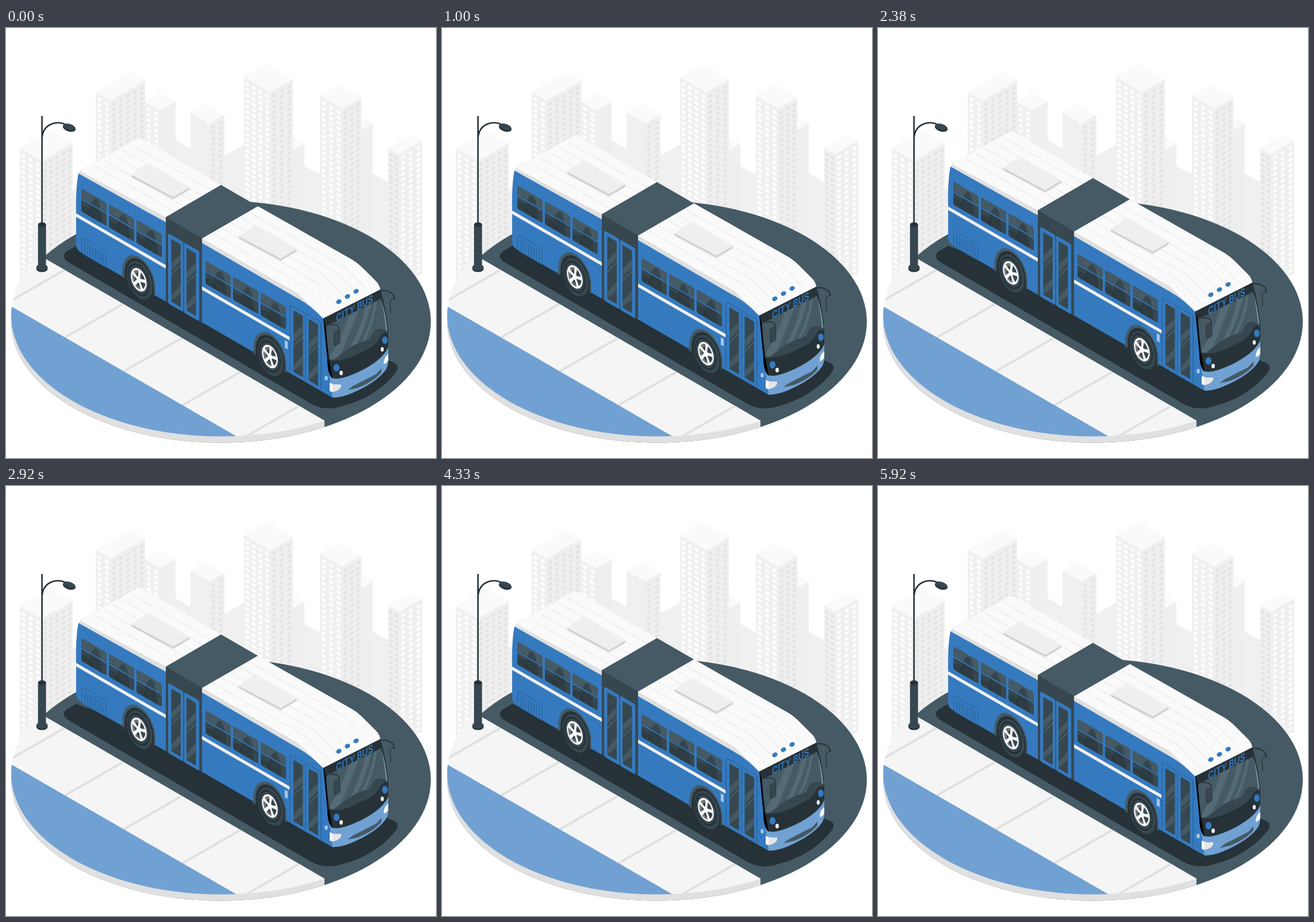
An HTML page for the animation above (5960 ms loop, 748 by 748 pixels).

```html
<!DOCTYPE html>
<html lang="en">
<head>
<meta charset="utf-8">
<title>City bus</title>
<style>
html, body { margin: 0; width: 100%; height: 100%; overflow: hidden; background: #fff; }
svg { display: block; width: 100vw; height: 100vh; }
</style>
</head>
<body>
<svg id="stage" viewBox="0 0 748 748"></svg>
<script>
const BLUE = '#357abf', PALE = '#71a1d3', DEEP = '#2a6299', MIST = '#a9c6e4';
const INK = '#263238', DARK = '#37474f', SLATE = '#455a64', WHITE = '#fafafa';
const SLOPE = 0.577;

const path = (d, fill, extra = '') => `<path d="${d}" fill="${fill}" ${extra}/>`;
const line = (d, color, width, extra = '') =>
  path(d, 'none', `stroke="${color}" stroke-width="${width}" ${extra}`);
const oval = (x, y, rx, ry, fill, turn = 0) =>
  `<ellipse cx="${x}" cy="${y}" rx="${rx}" ry="${ry}" fill="${fill}" transform="rotate(${turn} ${x} ${y})"/>`;
const rect = (w, h, r, fill, x = 0) => `<rect x="${x}" width="${w}" height="${h}" rx="${r}" fill="${fill}"/>`;
const repeat = (n, fn) => Array.from({ length: n }, (_, i) => fn(i)).join('');
// Walls that fall (k = 1) or climb (k = -1) to the right
const wall = (x, y, body, k = 1) => `<g transform="matrix(1 ${k * SLOPE} 0 1 ${x} ${y})">${body}</g>`;

// A block from its left corner and the widths of its two walls
function tower(x, y, left, right, leftGlass, rightGlass) {
  const h = 440 - y;
  const face = (w, fill, glass) => {
    const cols = Math.round(w / 12), pitch = w / cols;
    const d = repeat(cols, i => `M${(i + 0.5) * pitch} 7V${h}`);
    return path(`M0 0H${w}V${h}H0Z`, fill) + (glass ? line(d, glass, 6.2, 'stroke-dasharray="5.2 4.5"') : '');
  };
  const dy = left * SLOPE, ry = right * SLOPE;
  return wall(x, y, face(left, '#f0f0f0', leftGlass)) +
    wall(x + left, y + dy, face(right, '#efefef', rightGlass), -1) +
    path(`M${x} ${y}l${right} ${-ry} ${left} ${dy} ${-right} ${ry}Z`, WHITE);
}

function city() {
  const shade = '#e4e4e4', lit = '#fff';
  return path('M116 282L156 258V200L295 195L322 211L380 222L414 203L519 240L546 255L638 253L665 268V440H116Z', '#f0f0f0') +
    tower(479, 201, 20, 20) + tower(598, 166, 20, 20) +
    tower(242, 128, 26, 27, lit) +
    tower(156, 111, 26, 60, lit, shade) +
    tower(321, 147, 33, 26, '', shade) +
    tower(414, 85, 46, 39, lit, shade) +
    tower(546, 117.5, 39, 33, lit, shade) +
    tower(665, 208, 19, 40, shade, lit) +
    tower(24, 209, 38, 54, lit, shade);
}

function ground() {
  const R = 365, r = R * SLOPE, curb = x => 683 + 0.58 * (x - 554);
  const joints = repeat(5, i => `M${102 + 102 * i} ${curb(102 + 102 * i)}l-101 58`);
  return `<clipPath id="walk">${path(`M0 ${curb(0)}L554 683V748H0Z`)}</clipPath>
    <clipPath id="top">${oval(374, 500, R, r)}</clipPath>` +
    oval(374, 511, R, r, SLATE) +
    '<g clip-path="url(#walk)">' + oval(374, 511, R, r, '#e0e0e0') +
      '<g clip-path="url(#top)">' + rect(748, 748, 0, '#f5f5f5') +
        line(joints, '#e0e0e0', 4) + path('M0 479L403 711.5V748H0Z', PALE) +
      '</g></g>' +
    path('M122 379L105 389Q95 398 108 407L528 652Q553 668 584 658Q642 643 675 603Q687 589 676 583L655 574Z', INK);
}

function lamp() {
  return line('M62.6 153V345M62.6 192C64 168 86 159 106 169', INK, 2.6) +
    oval(110, 173.5, 11.5, 6.5, INK, 17) + oval(110, 172, 10.5, 5, DARK, 17) +
    oval(62.6, 419, 10, 5.5, INK) + oval(62.6, 416.5, 10, 5.5, DARK) +
    path('M55.6 342V417A7 4 0 0 0 69.6 417V342Z', DARK) +
    oval(62.6, 342, 7, 4, INK);
}

const busWindow = (x, y) => wall(x, y,
  rect(44, 40, 3, DARK) +
  path('M3 0H41Q44 0 44 3V16H0V3Q0 0 3 0Z', SLATE) +
  path('M13 33C16 20 20 3 27 3Q32 4 33 16L36 31V40H17Q11 38 13 33Z', INK, 'opacity=".5"') +
  path('M0 29L12 26Q18 29 19 40H3Q0 40 0 37Z', INK, 'opacity=".45"') +
  line('M0 18H44', BLUE, 2.2));

const glass = (x, y, h) => wall(x, y,
  rect(16.5, h, 1.5, DARK) +
  path(`M0 42l16.5-26v13l-16.5 26zM0 60l16.5-26v4l-16.5 26zM0 ${h - 11}l16.5-28v15l-16.5 23z`, SLATE));

function wheel(x, y) {
  const disc = (r, fill, dx = 0) => oval(dx, 0, r, r, fill);
  const spokes = repeat(5, i => path('M-2-4L-2.8-15H2.8L2-4Z', WHITE, `transform="rotate(${i * 72 + 8})"`));
  return `<g transform="matrix(.8 .42 0 1.12 ${x} ${y})">` +
    path('M-36 9V0A36 36 0 0 1 36 0V12Z', SLATE) +
    path('M-31 10V0A32 32 0 0 1 33 0V12Z', INK) +
    disc(28, DARK, 2) + disc(24, INK) + disc(21, DARK) +
    disc(17.2, WHITE) + disc(14.3, '#757575') + disc(11.5, DARK, 2.5) +
    spokes + disc(4.8, WHITE) + '</g>';
}

function hatch(x, y) {
  const top = 'M0 0l71 41-27 16-72-38Z';
  const style = fill => `stroke="${fill}" stroke-width="1.5" stroke-linejoin="round"`;
  return `<g transform="translate(${x} ${y})">` +
    path('M-28 19v4l72 38 27-16v-4Z', '#d2d2d2', style('#d2d2d2')) +
    path(top, '#efefef', style('#efefef')) + '</g>';
}

function roof() {
  const grooves = repeat(5, i => {
    const x = 16 * (i + 1), y = 9.3 * (i + 1);
    return `M${138 + x} ${249 - y}l140 80m64 37l164 94 42 42`;
  });
  return path('M126 256Q127 248 134 245L228 192.5Q232 190 237 193L374 273L278 329V338Z', '#e0e0e0') +
    path('M131 250Q130 247 135 245L228 192.5Q232 190 237 193L374 273L278 329Z', WHITE) +
    path('M341 366L438 310L602 403Q612 409 622 419L643 440Q650 447 651 455L552 506L505 470L341 375Z', '#e0e0e0') +
    path('M341 366L438 310L602 403Q612 409 622 419L643 440Q650 447 651 455L552 505L508 462Z', WHITE) +
    line(grooves, '#e8e8e8', 1.2) +
    hatch(247, 236) + hatch(434, 343) +
    repeat(3, i => oval(579 + 15 * i, 476 - 9 * i, 4.8, 3.8, BLUE, -30));
}

function bodySide() {
  const vents = repeat(8, i => `M${5.5 + i * 4.5} 6V25`);
  return path('M126 253L278 338V476L133 392Q122 386 122 378V324Q121 278 126 253Z', BLUE) +
    path('M341 374L505 469Q530 482 552 506L562 578L568 643L341 512Z', BLUE) +
    wall(122, 322.5, rect(156, 6, 0, '#f0f0f0')) + wall(341, 449.5, rect(153, 6, 0, '#f0f0f0')) +
    wall(132, 364, line('M4 0H39Q42 0 42 3V28H4Q0 28 0 24V4Q0 0 4 0Z' + vents, DEEP, 1.2)) +
    repeat(3, i => busWindow(131 + 48 * i, 279 + 27.4 * i) + busWindow(347 + 48 * i, 405 + 27.4 * i)) +
    // Flexible joint and its door
    path('M278 329L374 273L438 310L341 366Z', SLATE) +
    path('M278 329L341 366V513L278 476Z', DARK) +
    wall(282, 357, rect(26.5, 122, 3, BLUE) + rect(26.5, 122, 3, BLUE, 27.7)) +
    glass(287.5, 367, 109) + glass(314, 382.5, 109) +
    // Front door
    wall(494, 481, line('M0 117V4Q0 0 4 0H51Q54 0 54 4V117M27 2V117', DEEP, 1.3)) +
    glass(500, 491, 107) + glass(526.5, 506, 107) +
    wall(485, 543, rect(5, 13, 0, MIST)) + oval(557, 609, 2.8, 4, MIST) +
    wheel(231, 438) + wheel(459, 571.5);
}

function windshield() {
  const streak = (x, w) => `M${x} 477h${w}Q${x - 2} 530 ${x + w - 40} 576h${-w}Q${x - 8} 530 ${x} 477Z`;
  return `<clipPath id="pane">${path('M557 519L652 471Q662 499 664 535Q654 560 618 574Q585 589 564 580Q559 555 557 519Z')}</clipPath>
    <g clip-path="url(#pane)">` + rect(748, 748, 0, SLATE) +
    path(streak(600, 19) + streak(626, 10) + streak(641, 4), '#546a74') +
    path('M560 585L590 562Q605 549 634 541Q638 524 650 523Q660 523 670 535V590Z', DARK) +
    path('M640 450H670V527H661Q658 494 652 470Z', '#78909c') + '</g>';
}

function front() {
  return path('M560 583L568 643Q583 643 600 636Q645 617 661 594Q665 588 665 575V548Z', PALE) +
    path('M552 505L651 455Q661 485 665 528V555Q657 575 622 594Q582 614 568 609Q560 602 559 575Z', INK) +
    path('M552 503L556 519L561 578L568 582V610Q559 602 559 577Z', '#000') +
    windshield() +
    path('M562 577Q585 583 622 562Q642 554 650 540Q655 527 664 531V552L600 600L568 609Z', INK) +
    // Lights
    oval(575, 591, 5.2, 6.5, BLUE) + oval(659, 543, 4.8, 6.5, BLUE) +
    oval(583, 600, 3, 4, '#f0f0f0') + oval(654.5, 559, 2.7, 4, '#f0f0f0') +
    path('M563 617Q572 622 583 620Q584 627 575 631Q566 635 563 631Z', WHITE) +
    path('M568 620L583 620Q584 627 575 631L568 633Z', '#e6e6e6') +
    path('M665 567Q657 573 657 584Q662 584 665 578Z', WHITE) +
    path('M594 630L603 623L644 602L653 592V599Q640 615 612 626Z', SLATE) +
    `<text transform="matrix(.83 -.45 0 1.08 574 511.5)" font-family="Inter, 'Liberation Sans', sans-serif" font-size="16.6" font-weight="600" fill="${BLUE}">CITY BUS</text>` +
    // Mirrors
    line('M564 517Q574 514 579 520Q580 524 577 529', INK, 1.7) +
    path('M571 530Q572 526 580 526L581 546Q579 551 571 552Z', DARK, `stroke="${INK}"`) +
    line('M650 457Q668 455 674 465Q676 469 674 473', INK, 2) +
    path('M668 475Q670 471 677 470L678 489Q675 494 669 496Z', SLATE) +
    line('M669 496L668 475Q670 471 677 470', INK, 1.3);
}

const stage = document.getElementById('stage');
stage.innerHTML = city() + ground() + lamp() + `<g id="bus">${roof() + bodySide() + front()}</g>`;
const bus = document.getElementById('bus');

// The body rises and sinks at an even speed, in 143 steps per loop
const LOOP = 5960, STEPS = 143, RISE = 15;
function draw() {
  const step = Math.floor(performance.now() % LOOP / LOOP * STEPS + 0.05);
  const y = -RISE * (1 - Math.abs(1 - 2 * step / STEPS));
  bus.setAttribute('transform', `translate(0 ${y.toFixed(2)})`);
  requestAnimationFrame(draw);
}
draw();
</script>
</body>
</html>
```
